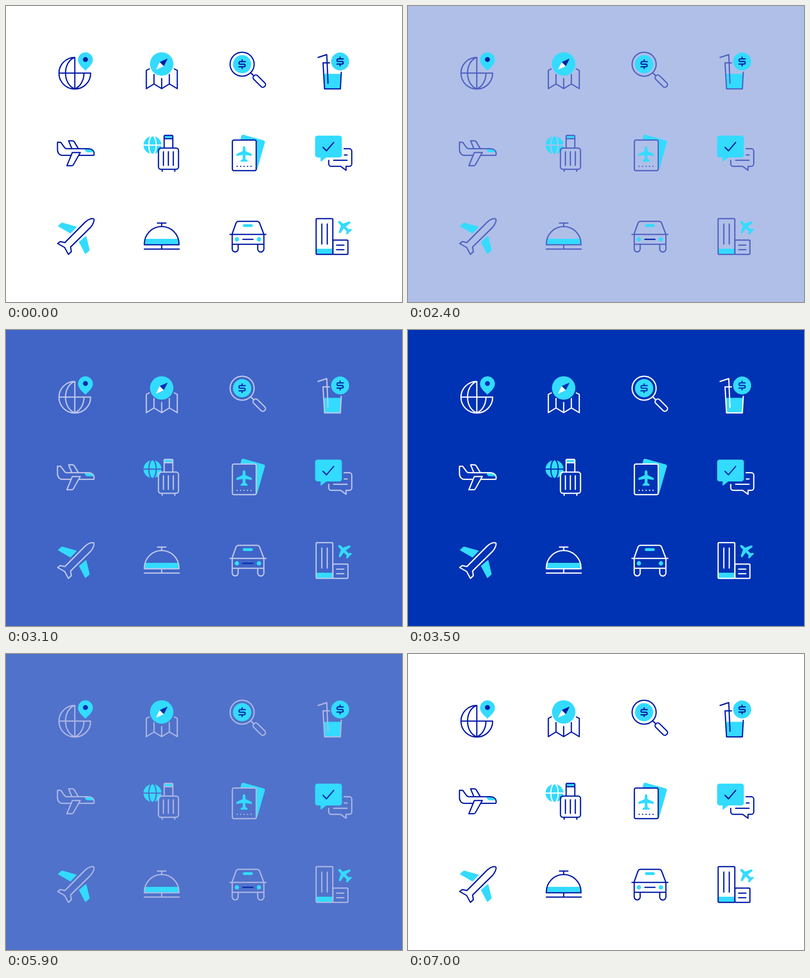
Write an HTML page that moves like this. It is 800x600 px and loops after 7.1 s.

```html
<!DOCTYPE html>
<html lang="en">
<head>
<meta charset="utf-8">
<title>Travel icons</title>
<style>
@property --bg { syntax: '<color>'; inherits: true; initial-value: #fff; }
@property --line { syntax: '<color>'; inherits: true; initial-value: #0019a5; }
@property --ink { syntax: '<color>'; inherits: true; initial-value: #0019a5; }
html, body { margin: 0; width: 100%; height: 100%; overflow: hidden; background: var(--bg); }
svg { display: block; width: 800px; height: 600px; background: var(--bg); }
svg * { stroke-linecap: round; stroke-linejoin: round; }
.line { fill: none; stroke: var(--line); stroke-width: 2.5; }
.ink { fill: none; stroke: var(--ink); stroke-width: 2.5; }
.gap { fill: none; stroke: var(--bg); stroke-width: 2.5; }
.inkfill { fill: var(--ink); }
.dots { fill: var(--line); }
.cyan { fill: #33dbff; }
.soft { fill: #33dbff; stroke: #33dbff; stroke-width: 2; }
</style>
</head>
<body>
<svg viewBox="0 0 800 600">
  <defs>
    <path id="dollar" class="ink" d="M6.3-5.2H-3.6a2.6 2.6 0 0 0 0 5.2H3.6a2.6 2.6 0 0 1 0 5.2H-6.3M0-8.8v3.6M0 5.2v3.6"/>
    <path id="plane" class="cyan" d="M0-16Q2.8-15 2.8-11V-6L15.5 0V4L2.8 2V10L7 13V15.5H-7V13L-2.8 10V2L-15.5 4V0L-2.8-6V-11Q-2.8-15 0-16z"/>
  </defs>

  <g id="globe">
    <path class="line" d="M139 104.3A32 32 0 1 0 171 136H107M139 104.3V168M139 104.3C114 113 114 159 139 168C151 163 157.500 150 157.500 136"/>
    <path class="cyan" d="M160.500 131C152 123 145.500 117 145.500 109a15 15 0 0 1 30 0C175.500 117 169 123 160.500 131z"/>
    <circle class="inkfill" cx="160.500" cy="108.500" r="5"/>
  </g>

  <g id="map">
    <path class="line" d="M289.500 127.500L283.500 130.500V167.500L299 158L314.500 167.500L330 158L346 167.500V130.500L340 127.500M299 139V158M314.500 147V167M330 139V158"/>
    <circle class="cyan" cx="314.500" cy="117.500" r="23.700"/>
    <path d="M304 128L310.500 114.500L318 121.500z" fill="#fff" stroke="#fff"/>
    <path class="inkfill" stroke="var(--ink)" d="M325.500 107.500L311.300 113.800L318.500 121z"/>
  </g>

  <g id="search">
    <circle class="line" cx="477" cy="118" r="24.300"/>
    <circle class="cyan" cx="477" cy="118" r="18.500"/>
    <use href="#dollar" x="477" y="118"/>
    <path class="line" d="M495 136L500 141"/>
    <rect class="line" x="-15.300" y="-5.300" width="30.600" height="10.600" rx="4.800" transform="translate(511.700 152.300) rotate(45)"/>
  </g>

  <g id="drink">
    <path class="cyan" d="M642 137.500H677.300L675.500 168H643.500z"/>
    <path class="line" d="M653.500 115.300H640.500L643.500 168H675.500L677.300 134.500M630.500 104.300L648 98.500L650.500 156.500"/>
    <circle class="cyan" cx="675" cy="112.500" r="18.200"/>
    <use href="#dollar" x="675" y="112.500"/>
  </g>

  <g id="jet">
    <path class="cyan" d="M159 289.500H166C172 289.500 176 292 177 296.500H165C161 296 159 293 159 289.500z"/>
    <path class="line" d="M131 302.700H114C108 302.700 104 298 104 291V276.300H110.500L118 286.500Q120 289.300 123 289.300H165C173 289.300 178 293 178 299V300.500Q178 302.700 176 302.700H147.500M133 289L126.500 273.300H134Q136.500 273.300 138 275.500L146 289M134 297H150L136 322Q135 323.700 133 323.700H123z"/>
  </g>

  <g id="luggage">
    <circle class="cyan" cx="296" cy="282" r="18.200"/>
    <ellipse class="gap" cx="296" cy="282" rx="7.500" ry="19"/>
    <path class="gap" d="M277 282H315"/>
    <rect class="cyan" x="320" y="263" width="17" height="6"/>
    <path class="line" d="M319.500 288V264.500Q319.500 262.300 321.700 262.300H334.800Q337 262.300 337 264.500V288M319.500 269H337M318 295.500V323M328 295.500V323M338 295.500V323M315.500 332V335M341 332V335"/>
    <rect class="line" x="308" y="288" width="40.500" height="43" rx="5"/>
  </g>

  <g id="passport">
    <path class="cyan" d="M473.500 271L475.500 263.500Q476.500 260.200 479.500 261L520.500 272.500Q523.800 273.500 523 276.500L507.500 331L505 334V271z"/>
    <rect x="457.300" y="271.700" width="48.200" height="62" rx="3" fill="var(--bg)" stroke="var(--line)" stroke-width="2.500"/>
    <use href="#plane" x="481" y="300"/>
    <g class="dots">
      <circle cx="467" cy="325" r="1.300"/><circle cx="474" cy="325" r="1.300"/><circle cx="481" cy="325" r="1.300"/><circle cx="488" cy="325" r="1.300"/><circle cx="495" cy="325" r="1.300"/>
    </g>
  </g>

  <g id="chat">
    <path class="cyan" d="M629.500 262.800H673.500a5 5 0 0 1 5 5V302a5 5 0 0 1-5 5H647L637 315Q635.500 316 635.500 314V307H629.500a5 5 0 0 1-5-5V267.800a5 5 0 0 1 5-5z"/>
    <path class="ink" d="M640.500 286.500L647.500 293.500L662 276.500"/>
    <path class="line" d="M683 289.300H693.500a5 5 0 0 1 5 5V320a5 5 0 0 1-5 5H687V333L676 325H657a5 5 0 0 1-5-5V313M683.500 302H689M662 312.700H689"/>
  </g>

  <g id="airliner">
    <path class="soft" d="M106 446L113 440L141.500 448L130 460z"/>
    <path class="soft" d="M161.500 467.500L168 495L160.500 501.500L148.500 478.500z"/>
    <path class="line" d="M104.500 481.500L109.500 477.500L119 479.500L160 438C166 432 174 430 177 431.500C179.500 434 176 443 171 448.500L130.500 488.500L132 498L126 503.500L118.500 489.500z"/>
  </g>

  <g id="bell">
    <path class="cyan" d="M281 472H348L349.500 484H279.500z"/>
    <path class="line" d="M306 440H323M314.500 440V447M279.500 484V482a35 35 0 0 1 70 0V484zM314.500 484V492.700M279.500 492.700H350"/>
  </g>

  <g id="car">
    <path class="line" d="M456.500 463L464.500 440.500Q466 436.500 470 436.500H507Q511 436.500 512.500 440.500L521 463M452.500 463H525M457 463V492.500a6 6 0 0 0 12 0V483M508.500 483V492.500a6 6 0 0 0 12.500 0V463M457 483H521"/>
    <rect class="cyan" x="478.500" y="442.300" width="20" height="5.600" rx="2.800"/>
    <circle class="cyan" cx="466.500" cy="473" r="4.400"/>
    <circle class="cyan" cx="511" cy="473" r="4.400"/>
    <path class="ink" d="M478.500 473H499"/>
  </g>

  <g id="airport">
    <path class="cyan" d="M627 492H660V503H627z"/>
    <rect class="line" x="626.500" y="431" width="33.700" height="72.500" rx="2"/>
    <rect class="line" x="660.200" y="474.500" width="30.600" height="29" rx="2"/>
    <path class="line" d="M638 442V482.500M649 442V482.500M668 484.700H682.500M668 494H682.500"/>
    <use href="#plane" transform="translate(683 447.500) rotate(-45)"/>
  </g>
</svg>
<script>
const LOOP = 7100;
const light = { '--bg': '#ffffff', '--line': '#0019a5', '--ink': '#0019a5' };
const dark = { '--bg': '#0032b4', '--line': '#ffffff', '--ink': '#0032b4' };

// Each fade advances in 16 equal steps of 100 ms; times sit 1 ms early to clear step edges.
const table = [
  [0, light, 'linear'],
  [1899, light, 'steps(16, end)'],
  [3499, dark, 'linear'],
  [5399, dark, 'steps(16, end)'],
  [6999, light, 'linear'],
  [LOOP, light, 'linear'],
];
document.documentElement.animate(
  table.map(([time, theme, easing]) => ({ ...theme, easing, offset: time / LOOP })),
  { duration: LOOP, iterations: Infinity }
);
</script>
</body>
</html>
```
